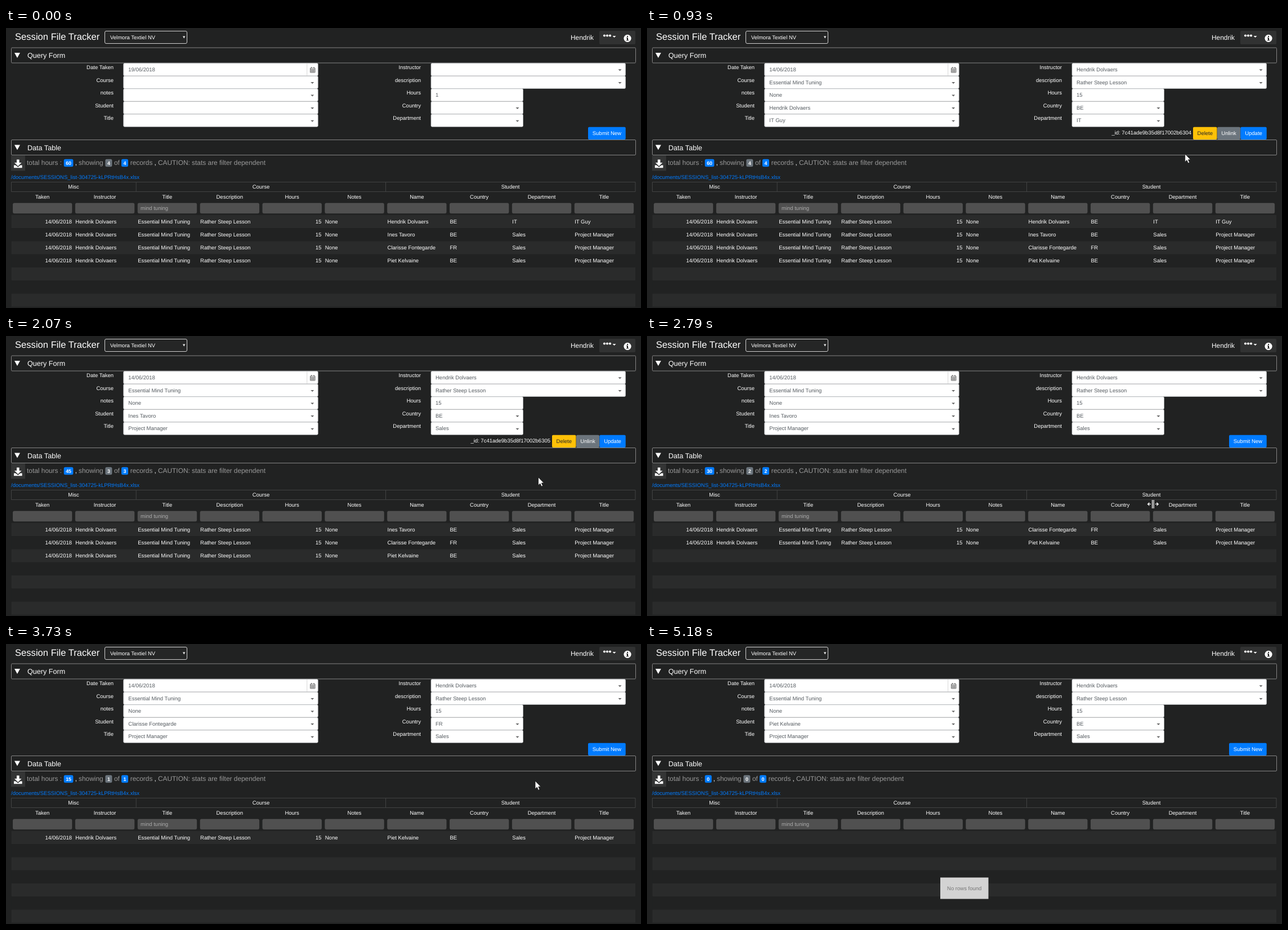
These frames come from a looping animation (1128x497 px, 5.29 s). An HTML page:

```html
<!DOCTYPE html>
<html lang="en">
<head>
<meta charset="utf-8">
<title>Session File Tracker</title>
<style>
  html, body { margin: 0; width: 100%; height: 100%; overflow: hidden; background: #212222; }
  svg { display: block; width: 100vw; height: 100vh; }
  text { font: 9.5px "Liberation Sans", Arial, sans-serif; fill: #fff; text-rendering: geometricPrecision; }
  .title { font-size: 16.6px; }
  .bar { font-size: 12.6px; }
  .large { font-size: 11.9px; }
  .muted { fill: #999; }
  .field { fill: #555b60; }
  .badge { font-size: 8.9px; font-weight: bold; }
  .mid { text-anchor: middle; }
  .end { text-anchor: end; }
</style>
</head>
<body>
<svg viewBox="0 0 1128 497" preserveAspectRatio="none">
  <g id="page"></g>
  <g id="live"></g>
</svg>
<script>
const LOOP = 5290, BLUE = '#007bff', GREY = '#6c757d';
const ROW_TOP = 332, ROW_H = 23.25, COL_LEFT = 9.5, COL_W = 110.85, FIELD_H = 22.6;

const INSTRUCTOR = 'Hendrik Dolvaers', COURSE = 'Essential Mind Tuning', LEVEL = 'Rather Steep Lesson';
const students = [
  [INSTRUCTOR, 'BE', 'IT', 'IT Guy', '7c41ade9b35d8f17002b6304'],
  ['Ines Tavoro', 'BE', 'Sales', 'Project Manager', '7c41ade9b35d8f17002b6305'],
  ['Clarisse Fontegarde', 'FR', 'Sales', 'Project Manager', '7c41ade9b35d8f17002b6306'],
  ['Piet Kelvaine', 'BE', 'Sales', 'Project Manager', '7c41ade9b35d8f17002b6307'],
];
const selectTimes = [620, 1800, 2980, 4120];
const deleteTimes = [1240, 2400, 3540, 4640];

// Pointer path: time, x, y
const path = [
  [50, 905, 480], [350, 856, 347], [500, 860, 338], [680, 860, 338], [1000, 982, 192],
  [1070, 987, 188], [1250, 987, 188], [1610, 884, 331], [1660, 881, 350], [1860, 881, 350],
  [2200, 985, 190], [2250, 987, 188], [2440, 987, 188], [2790, 899, 298], [2850, 893, 325],
  [2950, 890, 343], [3050, 890, 343], [3420, 986, 188], [3560, 986, 188], [3730, 940, 243],
  [3830, 940, 243], [3980, 893, 326], [4080, 892, 342], [4170, 892, 342], [4490, 986, 188],
  [4660, 986, 188], [5080, 1085, 489], [5180, 1085, 489],
];

const text = (x, y, str, cls = '', attrs = '') => `<text x="${x}" y="${y}" class="${cls}" ${attrs}>${str}</text>`;
const rect = (x, y, w, h, fill, attrs = '') => `<rect x="${x}" y="${y}" width="${w}" height="${h}" fill="${fill}" ${attrs}/>`;
const shape = (d, fill, attrs = '') => `<path d="${d}" fill="${fill}" ${attrs}/>`;
const caret = (x, y, fill) => shape(`M${x - 3} ${y}h6l-3 3z`, fill);
const colX = i => COL_LEFT + i * COL_W;

function sectionBar(y, label) {
  return rect(9.5, y, 1109, 27, '#202121', 'rx="1.5" stroke="#858585"') +
    shape(`M15 ${y + 9}h10l-5 9z`, '#fff') + text(38, y + 18, label, 'bar');
}

function formField(x, labelX, row, label, width, control) {
  const y = 62.6 + row * FIELD_H;
  let out = text(labelX, 73 + row * FIELD_H, label, 'end') +
    rect(x, y, width, 22.3, '#fff', 'rx="2" stroke="#b9bcbf" stroke-width=".7"');
  if (control === 'list') out += caret(x + width - 10, y + 10.7, '#666');
  if (control === 'date') {
    out += shape(`M${x + width - 19.5} ${y}v22`, 'none', 'stroke="#ccc" stroke-width=".8"') +
      shape('M540.5 71.2h8.4v7.8h-8.4zM540.5 73.6h8.4M540.5 76.3h8.4M543.3 73.6v5.4M546.1 73.6v5.4M542.5 69v2.5M547 69v2.5',
        'none', 'stroke="#555" stroke-width=".9"');
  }
  return out;
}

function drawPage() {
  let out = text(16, 21, 'Session File Tracker', 'title') +
    rect(175.5, 5.5, 146, 22, '#252626', 'rx="2.5" stroke="#d0d0d0"') +
    text(185, 19.7, 'Velmora Textiel NV') + shape('M314 14.5h4.4l-2.2 4z', '#eee') +
    text(1044, 21.3, 'Hendrik', 'large end') +
    rect(1054, 5, 64, 24, '#313232', 'rx="2"');
  for (const x of [1063, 1068, 1073]) out += `<circle cx="${x}" cy="13.5" r="2.1" fill="#fff"/>`;
  out += caret(1080.5, 14, '#fff') + '<circle cx="1104" cy="18.3" r="6.6" fill="#fff"/>' +
    shape('M1103 14h2v2h-2zM1102 17h3v4h1v1.3h-4v-1.3h1v-2.7h-1z', '#222');

  out += sectionBar(35, 'Query Form') + sectionBar(198.5, 'Data Table');
  ['Date Taken', 'Course', 'notes', 'Student', 'Title'].forEach((label, i) =>
    out += formField(208.7, 191, i, label, 345.5, i ? 'list' : 'date'));
  ['Instructor', 'description', 'Hours', 'Country', 'Department'].forEach((label, i) =>
    out += formField(755, 737, i, label, i < 2 ? 345.5 : 163.5, i === 2 ? '' : 'list'));

  out += rect(9, 226.5, 25, 27, '#343535') +
    shape('M19 233.5h4.6v5.5h4l-6.3 6.3-6.3-6.3h4z', '#fff') +
    shape('M14 243.5h3l4.3 3.5 4.3-3.5h3v4.7h-14.6z', '#fff') +
    text(9, 268, '/documents/SESSIONS_list-304725-kLPRtHsB4x.xlsx', '', `style="fill:${BLUE}"`);

  out += shape('M9.5 273.5H1118V290.5H9.5zM231.2 273.5v17M674.5 273.5v17', 'none', 'stroke="#424343"') +
    text(120, 285, 'Misc', 'mid') + text(453, 285, 'Course', 'mid') + text(896, 285, 'Student', 'mid');
  ['Taken', 'Instructor', 'Title', 'Description', 'Hours', 'Notes', 'Name', 'Country', 'Department', 'Title']
    .forEach((label, i) => {
      out += text(colX(i) + 55.2, 303, label, 'mid') +
        rect(colX(i) + 3, 311, 104.5, 17.8, '#505050', 'rx="2" stroke="#5d5d5d" stroke-width=".6"');
    });
  out += text(239, 323, 'mind tuning', '', 'style="fill:#aaa"');
  for (let i = 0; i < 7; i++) out += rect(9.5, ROW_TOP + i * ROW_H, 1108.5, ROW_H, i % 2 ? '#212222' : '#2a2b2b');
  return out;
}

function pointerAt(t) {
  if (t < path[0][0] || t >= path.at(-1)[0]) return null;
  const next = path.findIndex(p => p[0] > t);
  const [t0, x0, y0] = path[next - 1], [t1, x1, y1] = path[next];
  const k = (t - t0) / (t1 - t0);
  return { x: x0 + (x1 - x0) * k, y: y0 + (y1 - y0) * k };
}

function drawForm(student) {
  const left = student ? ['14/06/2018', COURSE, 'None', student[0], student[3]] : ['19/06/2018'];
  const right = student ? [INSTRUCTOR, LEVEL, '15', student[1], student[2]] : ['', '', '1'];
  const column = (x, values) => values.map((v, i) => text(x, 77 + i * FIELD_H, v, 'field')).join('');
  return column(217.3, left) + column(763, right);
}

function drawButtons(student, editing, overDelete) {
  const button = (x, w, label, fill, color = '#fff') =>
    rect(x, 175.7, w, 22.3, fill, 'rx="2"') + text(x + w / 2, 190, label, 'mid', `style="fill:${color}"`);
  if (!editing) return button(1034, 66.7, 'Submit New', BLUE);
  return text(967, 189.2, '_id: ' + student[4], 'end') +
    button(970, 42.5, 'Delete', overDelete ? '#e0a800' : '#ffc107', '#212529') +
    button(1013, 41, 'Unlink', GREY) + button(1054.3, 46.4, 'Update', BLUE);
}

function drawStats(count) {
  const badge = (x, w, value, fill) =>
    rect(x, 232.7, w, 13.6, fill, 'rx="2.5"') + text(x + w / 2, 242.7, value, 'badge mid');
  const label = (x, str, cls = 'large muted') => text(x, 242.6, str, cls);
  return label(37, 'total hours :') + badge(102.8, count ? 16.6 : 12, count * 15, BLUE) +
    `<g transform="translate(${count ? 0 : -5})">` +
    label(122.8, ',', 'large') + label(129, 'showing') + badge(176.4, 12, count, GREY) +
    label(192, 'of') + badge(205, 12, count, BLUE) + label(220.7, 'records') +
    label(263.5, ',', 'large') + label(270, 'CAUTION: stats are filter dependent') + '</g>';
}

function drawRows(rows, hovered) {
  let out = hovered < 0 ? '' : rect(9.5, ROW_TOP + hovered * ROW_H, 1108.5, ROW_H, '#464747');
  rows.forEach((s, r) => {
    const cells = ['14/06/2018', INSTRUCTOR, COURSE, LEVEL, '15', 'None', ...s.slice(0, 4)];
    cells.forEach((value, i) => {
      const right = i === 0 || i === 4;
      out += text(colX(i) + (right ? 107.5 : 3), 346.7 + r * ROW_H, value, right ? 'end' : '');
    });
  });
  if (!rows.length) out += rect(521, 414.5, 85.5, 38, '#d3d3d3') +
    text(563.7, 436.8, 'No rows found', 'mid', 'style="fill:#777"');
  return out;
}

function drawPointer({ x, y }, kind) {
  const outline = 'stroke="#111" stroke-width=".8" stroke-linejoin="round"';
  const art = {
    arrow: shape('M0 0V14.2L3.3 11.2 5.6 16.4 8 15.3 5.8 10.3H10z', '#fff', outline),
    hand: shape('M-1.6 1.5Q0-.7 1.6 1.5V6L6.8 7.4Q8.4 8 8 10.6L6.4 18H-1L-4.8 12.3Q-6 9.7-4 9.6L-1.6 11.5z', '#fff', outline) +
      shape('M1.6 6v3M4 6.7v2.7M6.2 7.4v2.4', 'none', 'stroke="#333" stroke-width=".6"'),
    resize: shape('M-1.3-7.5V7.5M1.3-7.5V7.5M-4 0H-9M-6.5-2.7L-9.3 0-6.5 2.7M4 0H9M6.5-2.7L9.3 0 6.5 2.7', 'none', 'stroke="#fff" stroke-width="1.3"'),
  };
  return `<g transform="translate(${x.toFixed(2)} ${y.toFixed(2)})">${art[kind]}</g>`;
}

function drawLive(t) {
  const passed = times => times.filter(time => t >= time).length;
  const selected = passed(selectTimes), deleted = passed(deleteTimes);
  const student = students[selected - 1], rows = students.slice(deleted);
  const editing = selected > deleted;
  const p = pointerAt(t);
  const rowIndex = p ? Math.floor((p.y - ROW_TOP) / ROW_H) : -1;
  const hovered = rowIndex >= 0 && rowIndex < rows.length ? rowIndex : -1;
  const overDelete = editing && p && p.x > 970 && p.x < 1012.5 && p.y > 176 && p.y < 198;
  const onDivider = p && Math.abs(p.x - 899) < 5 && p.y > 291 && p.y < 308;
  const kind = onDivider ? 'resize' : hovered >= 0 || overDelete ? 'hand' : 'arrow';
  return drawForm(student) + drawButtons(student, editing, overDelete) + drawStats(rows.length) +
    drawRows(rows, hovered) + (p ? drawPointer(p, kind) : '');
}

const live = document.getElementById('live');
let shown = '';
document.getElementById('page').innerHTML = drawPage();

function frame() {
  const markup = drawLive(performance.now() % LOOP);
  if (markup !== shown) live.innerHTML = shown = markup;
  requestAnimationFrame(frame);
}
frame();
</script>
</body>
</html>
```
